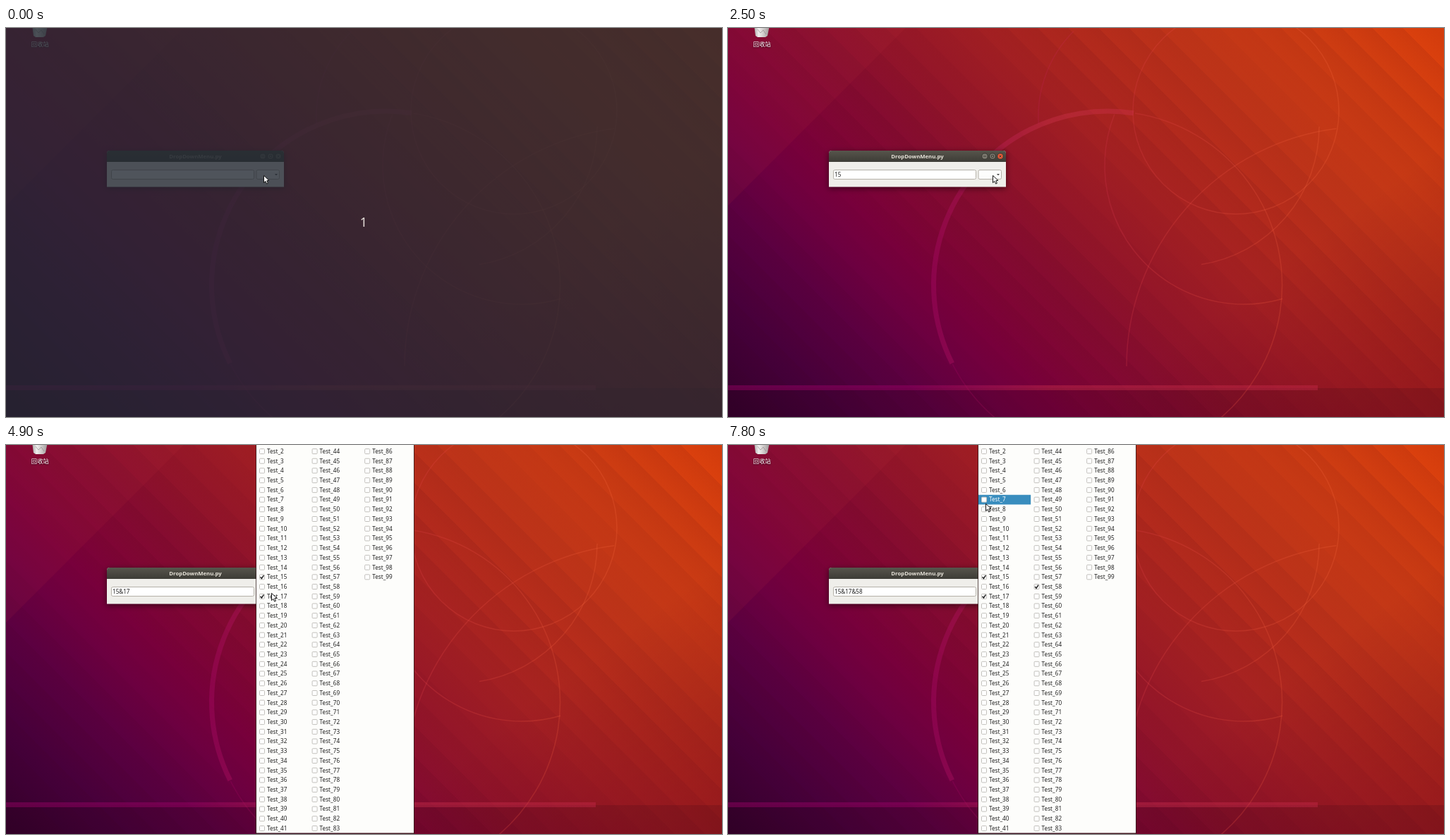
Write an HTML page with a canvas that moves like this. It is 1015 by 552 pixels and loops after 8000 ms.

```html
<!DOCTYPE html>
<html lang="en">
<head>
<meta charset="utf-8">
<title>Drop-down menu</title>
<style>
html, body { margin: 0; width: 100%; height: 100%; overflow: hidden; background: #33002a; }
canvas { display: block; }
</style>
</head>
<body>
<canvas id="stage" width="1015" height="552"></canvas>
<script>
const W = 1015, H = 552, LOOP = 8000, STEP = 100;
const ROW = 13.718, COL = 74.6, PER_COL = 42, LAST = 99;
const SANS = '"Noto Sans", "Open Sans", sans-serif';
const stage = document.getElementById('stage');
let g = stage.getContext('2d');

// Pointer path: time, x, y
const POINTER = [
  [0, 365, 209], [900, 365, 209], [1400, 365, 186], [2100, 365, 186],
  [2400, 375, 209], [3000, 375, 209], [3300, 364, 213], [3500, 364, 213],
  [3700, 364, 217], [4500, 364, 217], [4700, 376, 210], [5000, 376, 210],
  [5400, 439, 199], [5600, 439, 199], [5900, 439, 197], [6200, 439, 197],
  [6400, 402, 206], [6500, 402, 206], [6900, 366, 206], [7000, 366, 206],
  [7600, 365, 86], [7700, 365, 86], [7800, 365, 83]
];

// State changes over time; later entries override earlier ones
const CHANGES = [
  [0, { countdown: true, active: false, open: false, hover: false, pressed: 0, picked: [] }],
  [200, { countdown: false }],
  [500, { open: true }],
  [600, { active: true }],
  [1000, { hover: true }],
  [1600, { pressed: 15 }],
  [1700, { picked: [15] }],
  [2200, { pressed: 0 }],
  [2400, { open: false, hover: false }],
  [3100, { open: true }],
  [3200, { hover: true }],
  [3400, { pressed: 17 }],
  [3500, { picked: [15, 17] }],
  [3600, { pressed: 0 }],
  [3700, { open: false, hover: false }],
  [4900, { open: true }],
  [5100, { hover: true }],
  [5700, { pressed: 58 }],
  [5800, { picked: [15, 17, 58], pressed: 0 }],
  [5900, { open: false, hover: false }],
  [6700, { open: true }],
  [6900, { hover: true }]
];

function stateAt(t) {
  const state = {};
  for (const [start, change] of CHANGES) if (t >= start) Object.assign(state, change);
  return state;
}

function pointerAt(t) {
  const i = POINTER.findIndex(key => key[0] > t);
  if (i < 0) return POINTER[POINTER.length - 1].slice(1);
  const [t0, x0, y0] = POINTER[i - 1], [t1, x1, y1] = POINTER[i];
  const k = (t - t0) / (t1 - t0);
  return [x0 + (x1 - x0) * k, y0 + (y1 - y0) * k];
}

function rect(x, y, w, h, fill) {
  g.fillStyle = fill;
  g.fillRect(x, y, w, h);
}

function box(x, y, w, h, radius, fill, line) {
  g.beginPath();
  g.roundRect(x, y, w, h, radius);
  g.fillStyle = fill;
  g.fill();
  if (line) stroke(line, 1);
}

function stroke(color, width) {
  g.strokeStyle = color;
  g.lineWidth = width;
  g.stroke();
}

function arc(x, y, r, from, to, color, width) {
  g.beginPath();
  g.arc(x, y, r, from * Math.PI, to * Math.PI);
  stroke(color, width);
}

function path(points, close) {
  g.beginPath();
  for (const [x, y] of points) g.lineTo(x, y);
  if (close) g.closePath();
}

function label(text, x, y, color, font, align = 'left') {
  g.font = font;
  g.textAlign = align;
  g.fillStyle = color;
  g.fillText(text, x, y);
}

function linear(x0, y0, x1, y1, stops) {
  const gradient = g.createLinearGradient(x0, y0, x1, y1);
  for (const [at, color] of stops) gradient.addColorStop(at, color);
  return gradient;
}

function diagonal(stops) {
  return linear(0, H, 776, H - 776, stops);
}

function drawWallpaper() {
  rect(0, 0, W, H, diagonal([
    [0, '#33002a'], [.1, '#45003a'], [.19, '#5a0041'], [.26, '#6e0040'], [.31, '#78003b'],
    [.36, '#7f0535'], [.42, '#860c30'], [.48, '#92142a'], [.55, '#9c1b25'],
    [.68, '#b52b1c'], [.77, '#c03518'], [.87, '#cb3b13'], [1, '#de410c']
  ]));

  // Faint parallel folds
  const folds = [], count = 36;
  for (let i = 0; i < count; i++) {
    const depth = .02 + .07 * Math.abs(Math.sin(i * 12.9));
    folds.push([i / count, 'rgba(70,0,20,0)'], [(i + .98) / count, `rgba(70,0,20,${depth})`]);
  }
  rect(0, 0, W, H, diagonal(folds));

  path([[0, 0], [252, 0], [0, 252]], true);
  g.fillStyle = 'rgba(190,50,60,.1)';
  g.fill();
  rect(0, 0, W, H, linear(830, 300, 1015, 552, [[0, 'rgba(110,0,30,0)'], [1, 'rgba(110,0,30,.4)']]));
  rect(0, 511, W, 41, 'rgba(30,0,20,.14)');

  const thin = linear(0, 0, W, 0, [[.3, 'rgba(160,0,100,.25)'], [.6, 'rgba(230,70,70,.24)'], [1, 'rgba(255,120,50,.25)']]);
  const thick = linear(0, 0, W, 0, [[.25, 'rgba(160,0,105,.42)'], [.45, 'rgba(205,50,75,.4)'], [.85, 'rgba(200,40,75,.4)']]);
  arc(538.5, 365, 247, -.45, .85, thin, 1.5);
  arc(720, 118, 146, 0, 2, thin, 1.5);
  arc(731, 195, 197, .41, 1.12, thin, 1.5);
  arc(610, 125, 170, .98, 1.25, thin, 1.5);
  arc(640, 140, 198, 0, .45, thin, 1.5);
  arc(905, 480, 340, 1, 1.46, thin, 1.5);
  arc(538.5, 365, 247, .852, 1.547, thick, 7);
  rect(0, 507, 836, 7, thick);

  // Bin
  path([[37, -4], [59, -4], [56, 11], [53, 13], [42, 13], [39, 11]], true);
  g.fillStyle = linear(37, 0, 59, 0, [[0, '#aaa6a6'], [.3, '#f0efee'], [.6, '#cfcbca'], [1, '#9d9797']]);
  g.fill();
  path([[42, 2], [46, 7], [50, 3], [54, 9]]);
  stroke('rgba(120,115,115,.5)', 1);
  g.shadowColor = 'rgba(0,0,0,.7)';
  g.shadowBlur = 2;
  g.shadowOffsetY = 1;
  label('回收站', 48.3, 25.5, '#fff', '8.3px "Noto Sans CJK SC", "Noto Sans CJK", sans-serif', 'center');
}

function drawWindow(state, overButton) {
  g.save();
  g.shadowColor = 'rgba(0,0,0,.55)';
  g.shadowBlur = 9;
  g.shadowOffsetY = 2;
  box(143, 174, 251, 51.5, [4, 4, 0, 0], '#efeeea');
  g.restore();
  const bar = state.active ? ['#57554c', '#3d3c36'] : ['#42413a', '#3b3a34'];
  box(143, 174, 251, 16, [4, 4, 0, 0], linear(0, 174, 0, 190, [[0, bar[0]], [1, bar[1]]]));
  label('DropDownMenu.py', 268.5, 184.7, state.active ? '#e6e2d8' : '#858178', `bold 7.75px ${SANS}`, 'center');

  [364, 375, 386].forEach((x, i) => {
    g.beginPath();
    g.arc(x, 182, 4.1, 0, 2 * Math.PI);
    g.fillStyle = !state.active ? '#66645b' : i === 2 ? '#ea5a38' : '#7d7a70';
    g.fill();
    stroke('#34332e', .8);
    g.beginPath();
    if (i === 1) g.rect(x - 1.5, 180.5, 3, 3);
    else if (i === 0) { g.moveTo(x - 2, 182); g.lineTo(x + 2, 182); }
    else {
      g.moveTo(x - 1.5, 180.5); g.lineTo(x + 1.5, 183.5);
      g.moveTo(x + 1.5, 180.5); g.lineTo(x - 1.5, 183.5);
    }
    stroke('#3a3933', .9);
  });

  box(149.5, 201.5, 202, 13, 2, '#fff', '#b4b0a8');
  label(state.picked.join('&'), 151, 210.9, '#222', `8.1px ${SANS}`);
  const face = overButton ? ['#fff', '#fafaf9'] : ['#fbfbfa', '#ebeae7'];
  box(355, 201.5, 32.5, 13, 2, linear(0, 201, 0, 215, [[0, face[0]], [1, face[1]]]), '#b4b0a8');
  path([[381, 207], [385, 207], [383, 209.2]], true);
  g.fillStyle = '#444';
  g.fill();
}

function drawMenu(state, px, py) {
  rect(354, 0, 225, 552, 'rgba(50,30,30,.75)');
  rect(355, 0, 223, 550.5, '#fdfdfb');
  const hoverCol = Math.floor((px - 355) / COL);
  const hoverRow = Math.floor((py - 9) / ROW + .5) + 1;
  for (let n = 1; n <= LAST; n++) {
    const col = Math.floor((n - 1) / PER_COL), row = (n - 1) % PER_COL;
    const x = 355 + col * COL, y = 9 + (row - 1) * ROW;
    const lit = state.hover && col === hoverCol && row === hoverRow;
    if (lit) rect(x, y - ROW / 2, 74.2, ROW, '#398dbe');
    box(x + 4.5, y - 3.5, 7, 7, 1, state.pressed === n ? '#d5d3d0' : '#fff', '#c2c0bc');
    if (state.picked.includes(n) && state.pressed !== n) {
      path([[x + 5.6, y], [x + 7.4, y + 2.2], [x + 10.4, y - 2.4]]);
      stroke('#222', 1.5);
    }
    label('Test_' + n, x + 15, y + 2.9, lit ? '#fff' : '#222', `8.2px ${SANS}`);
  }
}

function drawPointer(x, y) {
  path([[0, 0], [0, 10.3], [2.4, 8.1], [4.1, 11.8], [5.9, 11], [4.3, 7.4], [7.4, 7.1]]
    .map(([dx, dy]) => [x + .5 + dx, y + .3 + dy]), true);
  g.fillStyle = '#fff';
  g.fill();
  stroke('#151515', 1);
}

const wallpaper = document.createElement('canvas');
wallpaper.width = W;
wallpaper.height = H;
const screen = g;
g = wallpaper.getContext('2d');
drawWallpaper();
g = screen;

function frame(now) {
  const t = Math.floor((now % LOOP) / STEP) * STEP;
  const state = stateAt(t), [x, y] = pointerAt(t);
  g.drawImage(wallpaper, 0, 0);
  drawWindow(state, x > 355 && x < 388 && y > 201 && y < 215);
  if (state.open) drawMenu(state, x, y);
  if (state.countdown) {
    rect(0, 0, W, H, 'rgba(36,42,50,.8)');
    label('1', 507, 282, '#e6dfda', `18px ${SANS}`, 'center');
  }
  drawPointer(x, y);
  requestAnimationFrame(frame);
}
requestAnimationFrame(frame);
</script>
</body>
</html>
```
